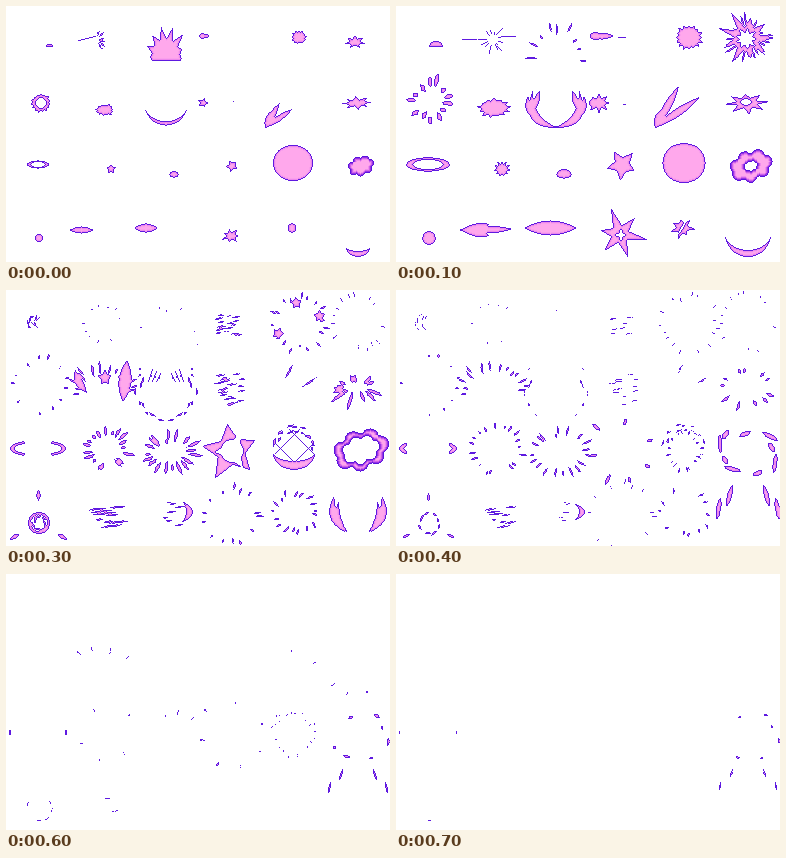
An HTML page with a canvas for the animation above (0.8 s loop, 384 by 256 pixels).

```html
<!DOCTYPE html>
<html lang="en">
<head>
<meta charset="utf-8">
<title>Impact effects</title>
<style>
html, body { margin: 0; width: 100%; height: 100%; overflow: hidden; background: #fff; }
canvas { display: block; width: 384px; height: 256px; image-rendering: pixelated; }
</style>
</head>
<body>
<canvas id="stage" width="384" height="256"></canvas>
<script>
const W = 384, H = 256, STEP = 100, COUNT = 8, PI = Math.PI;
const view = document.getElementById('stage').getContext('2d');
const mask = document.createElement('canvas');
mask.width = W;
mask.height = H;
const g = mask.getContext('2d', { willReadFrequently: true });

// colours from the edge inwards
const BODY = [255, 168, 236];
const PLAIN = [[94, 26, 224], [236, 136, 236], [250, 160, 236]];
const DEEP = [[90, 20, 222], [150, 52, 226], [206, 98, 234], [240, 142, 238]];

function random(seed) {
  let s = (seed * 1103515 + 12345) % 2147483647;
  return () => (s = s * 16807 % 2147483647) / 2147483647;
}

const fill = d => g.fill(new Path2D(d));
function cut(d) {
  g.globalCompositeOperation = 'destination-out';
  fill(d);
  g.globalCompositeOperation = 'source-over';
}

// shapes as path data
const oval = (x, y, rx, ry = rx) =>
  `M${x - rx} ${y}a${rx} ${ry} 0 1 0 ${2 * rx} 0a${rx} ${ry} 0 1 0 ${-2 * rx} 0Z`;
const dome = (x, y, rx, ry) => `M${x - rx} ${y}a${rx} ${ry} 0 0 1 ${2 * rx} 0Z`;
const bowl = (x, y, r, ry, thick) =>
  `M${x - r} ${y}a${r} ${ry} 0 0 0 ${2 * r} 0a${r} ${ry - thick} 0 0 1 ${-2 * r} 0Z`;
const crescent = (x, y, r) =>
  `M${x} ${y - r}a${r} ${r} 0 0 0 0 ${2 * r}a${r * 1.5} ${r * 1.5} 0 0 1 0 ${-2 * r}Z`;

function star(x, y, rx, ry, n, inner, rot = -PI / 2, jag = .25) {
  const r = random(n + rx);
  let d = '';
  for (let i = 0; i < n * 2; i++) {
    const a = rot + PI * i / n, k = i % 2 ? inner : 1.08 - jag * r();
    d += (i ? 'L' : 'M') + (x + Math.cos(a) * rx * k) + ' ' + (y + Math.sin(a) * ry * k);
  }
  return d + 'Z';
}

// pointed at both ends, w wide, bowed sideways by bend
function leaf(x, y, x2, y2, w, bend = 0) {
  const l = Math.hypot(x2 - x, y2 - y), nx = (y - y2) / l, ny = (x2 - x) / l;
  const mid = o => `${(x + x2) / 2 + nx * o} ${(y + y2) / 2 + ny * o}`;
  return `M${x} ${y}Q${mid(2 * bend + w)} ${x2} ${y2}Q${mid(2 * bend - w)} ${x} ${y}Z`;
}

function mirror(x, draw) {
  draw();
  g.save();
  g.translate(2 * x, 0);
  g.scale(-1, 1);
  draw();
  g.restore();
}

// tapered line on whole pixels
function sliver(x, y, x2, y2, w = 1) {
  const n = Math.round(Math.max(Math.abs(x2 - x), Math.abs(y2 - y)));
  for (let i = 0; i <= n; i++) {
    const t = n ? i / n : .5, s = Math.max(1, Math.round(w * Math.sin(PI * (t * .8 + .1))));
    const o = (s - 1) / 2;
    g.fillRect(Math.round(x + (x2 - x) * t - o), Math.round(y + (y2 - y) * t - o), s, s);
  }
}

// slivers that fly outwards, slow down, shrink and die one by one
function debris(k, { at, x, y, n, r, ry = r, grow = 14, len = 8, w = 2.4, fade = .55,
  from = 0, to = 2 * PI, turn = 0, last = 6 }) {
  const age = k - at, u = random(n * 7 + x);
  if (age < 0 || k > last) return;
  const push = grow * (1 - .5 ** age), thick = w * .78 ** age;
  for (let i = 0; i < n; i++) {
    const a = from + (to - from) * (i + .8 * u()) / n, spread = .8 + .35 * u();
    const l = len * (.4 + 1.1 * u()) * fade ** age, life = 1.2 + 3 * u();
    if (age > life) continue;
    const px = x + Math.cos(a) * (r * spread + push), py = y + Math.sin(a) * (ry * spread + push);
    sliver(px, py, px + Math.cos(a + turn) * l, py + Math.sin(a + turn) * l, thick);
  }
}

// sideways slivers drifting right
function streaks(k, { at, x, y, w, h, n, len, drift = 14, thick = 2, slope = -.12, last = 6 }) {
  const age = k - at, u = random(n * 5 + x);
  if (age < 0 || k > last) return;
  for (let i = 0; i < n; i++) {
    const px = x + w * u() + drift * (1 - .6 ** age) * 1.5, py = y + h * (i + u()) / n;
    const l = len * (.3 + u()) * .6 ** age;
    if (age < 1 + 2.6 * u()) sliver(px, py, px + l, py + l * slope, thick * .8 ** age);
  }
}

function cloud(x, y, rx, ry, hole) {
  const lobes = (s, paint) => {
    paint(oval(0, 0, rx * .82 * s, ry * .8 * s));
    for (let i = 0; i < 7; i++) {
      const a = i * 2 * PI / 7;
      paint(oval(Math.cos(a) * rx * .66 * s, Math.sin(a) * ry * .6 * s, ry * .42 * s));
    }
  };
  g.save();
  g.fillStyle = '#f00';
  g.translate(x, y);
  g.rotate(-.3);
  lobes(1, fill);
  if (hole) lobes(hole, cut);
  g.restore();
}

const effects = [
  // row 1
  k => {
    if (k < 2) fill(dome(43.5 - 3.5 * k, 41, 3.5 * (k + 1), 3 * (k + 1)));
    if (k === 2) [28, 38].forEach(x => fill(crescent(x, 33.5, 7.5)));
    [28, 34].forEach(x => debris(k, { at: 3, x, y: 33, n: 4, r: 6, grow: 5, len: 5, w: 1.6, from: 2, to: 4.4, turn: PI / 2, last: 5 }));
  },
  k => {
    if (k === 0) sliver(72, 34, 89, 30);
    if (k === 1 || k === 2) {
      sliver(66, 33, 80 - 10 * (k - 1), 33);
      sliver(105, 30, 119, 30);
    }
    debris(k, { at: 0, x: 90, y: 33, n: 6, r: 4, len: 5, w: 1.6, from: -1.3, to: 1.3, last: 0 });
    debris(k, { at: 1, x: 96, y: 33, n: 12, r: 6, grow: 16, len: 6, w: 1.2, fade: .45, last: 4 });
  },
  k => {
    if (k === 0) {
      fill(star(160, 50, 23, 28, 13, .62, -PI / 2 - .2, .4));
      cut('M130 55h60v30h-60Z');
    }
    debris(k, { at: 1, x: 160, y: 52, n: 9, r: 21, ry: 27, grow: 9, len: 7, from: PI, to: 2 * PI + .2, fade: .35, last: 4 });
  },
  k => {
    if (k < 2) {
      fill(oval(196.5 + 3 * k, 30, 3 + 3 * k, 3 + k));
      fill(leaf(194, 30, 204 + 14 * k, 30, 4 + 3 * k));
    }
    if (k === 1) sliver(222, 31, 229, 31);
    if (k === 2) sliver(214, 32, 238, 27);
    streaks(k, { at: 2, x: 198, y: 24, w: 26, h: 22, n: 17, len: 11, last: 4 });
  },
  k => {
    if (k < 2) fill(star(293, 31.5, 8 + 7 * k, 7.5 + 6 * k, 13 + 3 * k, .74));
    if (k === 2 || k === 3) {
      const size = 13 - 2 * k;
      for (const a of [-1.65, -.35, k === 2 ? .6 : 2.6])
        fill(star(292 + 23 * Math.cos(a), 33 + 20 * Math.sin(a), size, size, 5, .52, a));
    }
    debris(k, { at: 2, x: 292, y: 33, n: 19, r: 18, grow: 12, len: 7, last: 5 });
  },
  k => {
    if (k === 0) fill(star(349, 36, 11, 7, 7, .5));
    if (k === 1) {
      fill(star(351, 32, 30, 28, 9, .4, -1.4, .35));
      cut(star(350, 33, 12, 11, 9, .5, -1.4));
    }
    if (k === 2) fill(leaf(357, 38, 373, 46, 7));
    debris(k, { at: 1, x: 352, y: 32, n: 21, r: 12, grow: 18, len: 10, last: 5 });
  },
  // row 2
  k => {
    if (k === 0) {
      fill(star(35, 97, 10.5, 10, 15, .78));
      cut(oval(35, 97, 5));
    }
    debris(k, { at: 1, x: 35, y: 95, n: 13, r: 14, grow: 15, len: 9, w: 4, fade: .6 });
  },
  k => {
    if (k < 2) fill(star(99 - k, 104 - 2 * k, 10 + 7 * k, 6.5 + 4 * k, 13, .72));
    if (k === 2) {
      fill(star(106, 94, 19, 19, 10, .75, -1.2));
      cut(oval(99, 93, 7, 6));
      cut(leaf(84, 106, 110, 106, 10));
      fill(leaf(71, 78, 83, 103, 10, 3));
    }
    if (k === 3) {
      fill(leaf(69, 80, 81, 103, 8, 2));
      fill(star(99, 88, 8, 9, 5, .5));
      fill(leaf(121, 70, 117, 112, 13));
    }
    debris(k, { at: 3, x: 96, y: 104, n: 15, r: 27, ry: 23, grow: 6, len: 9, fade: .8, from: PI, to: 2 * PI });
  },
  k => {
    if (k === 0) fill(bowl(160, 97, 22, 22.5, 4));
    if (k === 1) mirror(160, () => {
      fill(leaf(137, 84, 163, 122, 9, 13));
      fill(leaf(132, 90, 137, 112, 6, 2));
      fill(leaf(144, 84, 137, 106, 6));
    });
    if (k === 2 || k === 3) mirror(160, () => {
      for (let i = 0; i < 3; i++)
        sliver(146 + 4 * i, 79 + 2 * i, 139 + 4 * i + k, 94 - 3 * (k - 2), 4.5 - k);
    });
    mirror(160, () => debris(k, { at: 2, x: 160, y: 97, n: 10, r: 27, grow: 5, len: 9, w: 2.6, from: PI / 2, to: 3.9, turn: PI / 2 + .2 }));
  },
  k => {
    if (k === 0) fill(star(197, 97, 6, 5, 5, .5, 0));
    if (k === 1) {
      fill(star(203, 97, 12, 10, 8, .55, 0));
      fill(oval(199, 97, 6, 5));
    }
    if (k < 2) sliver(227, 95 + 3 * k, 227 + 2 * k, 95 + 3 * k);
    if (k === 2) sliver(202, 97, 222, 91, 2);
    streaks(k, { at: 2, x: 198, y: 83, w: 27, h: 32, n: 20, len: 12, last: 5 });
  },
  k => {
    const tips = [[44, -30], [23, -41], [6, -18]];
    if (k < 2) for (const [x, y] of tips) {
      const s = k ? 1 : .6 + .3 * (x < 10);
      fill(leaf(259, 122, 260 + x * s, 121 + y * s, 6 + 2 * k));
    }
    const age = k - 2;
    if (age >= 0 && k < 7) for (const [x, y] of tips.slice(0, 2)) {
      const a = .55 + .55 * (1 - .5 ** age), b = a + .6 * .5 ** age;
      sliver(260 + x * a, 121 + y * a, 260 + x * b, 121 + y * b, 2.4 * .8 ** age);
    }
    if (k === 2) sliver(283, 98, 291, 91, 2);
  },
  k => {
    if (k < 3) fill(star(351, 97, 16 + 6 * k, 7 + 4 * k, 8, .5, -.1));
    if (k === 1) cut(oval(350, 96, 5, 3));
    if (k === 2) cut(star(351, 97, 10, 5, 6, .5, 0));
    if (k === 3) fill(star(333, 100, 8, 6, 5, .5, 0));
    debris(k, { at: 3, x: 350, y: 97, n: 11, r: 12, ry: 5, grow: 19, len: 14, w: 3.4 });
  },
  // row 3
  k => {
    const rx = 29.5 - 18.5 * .42 ** k, ry = 8.5 - 4.5 * .3 ** k, gap = 30 * (1 - .55 ** (k - 2));
    fill(oval(32, 158.5, rx, ry));
    cut(oval(32, 158.5, rx - (k < 2 ? 4 + 3 * k : 5), ry - (k < 2 ? 1.5 + k : 2.8)));
    if (gap > 0) cut(`M${32 - gap} 145h${2 * gap}v28h${-2 * gap}Z`);
  },
  k => {
    if (k < 2) fill(star(105 + k, 163, 5 + 4 * k, 5 + 4 * k, 5 + 6 * k, .55));
    if (k === 2) fill(star(103, 164, 17, 16, 15, .66, -1.2, .35));
    debris(k, { at: 3, x: 100, y: 160, n: 18, r: 15, grow: 14, len: 8, w: 3, from: 1.6, to: 7.4, fade: .6 });
  },
  k => {
    if (k < 2) {
      fill(dome(168, 169, 4.5 + 3 * k, 4 + 2 * k));
      fill(oval(168, 169, 4.5 + 3 * k, 2.5 + k));
    }
    if (k === 2) fill(star(168, 165, 20, 15, 17, .72));
    debris(k, { at: 3, x: 163, y: 162, n: 19, r: 18, ry: 11, grow: 13, len: 10, w: 3, fade: .68 });
  },
  k => {
    if (k === 0) fill(star(226, 160, 7, 7, 5, .5, -2));
    if (k === 1) fill(star(226, 159, 16, 16, 5, .5, -2.1));
    if (k === 2) {
      fill(star(224, 160, 26, 26, 7, .58, -.2));
      cut(oval(225, 160, 6));
    }
    if (k === 3) {
      fill(star(225, 161, 32, 30, 5, .46, -1.7));
      cut(oval(226, 161, 11));
      cut(star(226, 161, 19, 19, 3, .4, -1.1));
    }
    debris(k, { at: 4, x: 225, y: 160, n: 7, r: 27, grow: 6, len: 8, w: 3.4, from: -1.8, to: 4.4 });
  },
  k => {
    const bars = w => [-7, 7].forEach(o => {
      sliver(276 + o, 146 - o, 300 + o, 170 - o, w);
      sliver(276 + o, 170 + o, 300 + o, 146 + o, w);
    });
    if (k < 2) fill(oval(287 + k, 157, 20 + 1.5 * k, 18 + 2 * k));
    if (k === 2 || k === 3) {
      bars(7 - 2 * k);
      cut(oval(288, 158, 5));
    }
    if (k === 2) {
      fill(oval(288, 158, 21.5, 21) + star(288, 158, 17, 17, 40, 1, 0, .08).replace('Z', '')) ;
      cut(oval(288, 158, 17));
      bars(3);
    }
    if (k === 3) fill(bowl(288, 161, 21.5, 19, 9));
    debris(k, { at: 3, x: 288, y: 158, n: 16, r: 20, grow: 3, len: 5, w: 2, from: PI, to: 2 * PI, turn: PI / 2 });
    debris(k, { at: 4, x: 288, y: 161, n: 18, r: 16, grow: 5, len: 3, w: 1.5 });
  },
  k => {
    if (k < 4) cloud(355, 160, 33 - 19 * .5 ** k, 22 - 12 * .5 ** k, k && 1 - .7 ** k);
    debris(k, { at: 4, x: 352, y: 161, n: 9, r: 28, ry: 20, grow: 3, len: 13, w: 4.4, turn: PI / 2, fade: .6, last: 7 });
  },
  // row 4
  k => {
    const spokes = (from, to, w) => [0, 1, 2].forEach(i => {
      const a = -PI / 2 + i * 2 * PI / 3, c = Math.cos(a), s = Math.sin(a);
      fill(leaf(32.5 + c * from, 233 + s * from, 32.5 + c * to, 233 + s * to, w));
    });
    if (k < 2) fill(oval(33, 232, 4 + 2.8 * k));
    if (k === 2) {
      fill(star(32.5, 234, 27, 30, 3, .4, -PI / 2, 0));
      cut(oval(33, 232, 5.5));
    }
    if (k === 3) {
      fill(oval(33, 233, 11));
      cut(oval(33, 233, 8));
    }
    if (k > 2 && k < 6) spokes(24 - 2 * k / 3, 42 - 3 * k, 9 - 1.5 * k);
    debris(k, { at: 3, x: 33, y: 233, n: 9, r: 6, grow: 8, len: 5, turn: PI / 2, fade: .8, last: 7 });
  },
  k => {
    if (k === 0) fill(leaf(63, 224, 88, 224, 7));
    if (k === 1 || k === 2) {
      fill(leaf(62, 224, 109 + 8 * k, 223, 7 + k));
      [-1, 1].forEach(s => fill(leaf(62 + 3 * k, 224, 80 + 14 * k, 224 + s * (2 + 4 * k), 5 + 2 * k)));
    }
    streaks(k, { at: 3, x: 82, y: 215, w: 24, h: 22, n: 9, len: 18, drift: 10 });
  },
  k => {
    if (k < 2) fill(leaf(128, 222, 152 + 29 * k, 222, 9 + 6 * k));
    if (k > 1 && k < 6) {
      const s = 13 - 2 * (k - 2);
      fill(leaf(174 + 2 * (k - 2), 222 - s, 172 + 3 * (k - 2), 222 + s, 8 - (k - 2), -8));
    }
    streaks(k, { at: 2, x: 146, y: 209, w: 14, h: 28, n: 7, len: 14, drift: 18 });
  },
  k => {
    if (k === 0) fill(star(225, 230, 10, 8, 7, .48, 0));
    if (k === 1) {
      fill(star(224, 228, 27, 26, 6, .34, .2, .35));
      cut(star(225, 229, 6, 6, 4, .4, 0));
    }
    debris(k, { at: 2, x: 224, y: 225, n: 14, r: 13, grow: 24, len: 9 });
  },
  k => {
    if (k === 0) fill(oval(286, 222, 4.5));
    if (k === 1) {
      fill(star(286, 222, 14, 13, 7, .42, -.8, .4));
      cut(leaf(281, 230, 291, 214, 2));
    }
    if (k === 2) {
      fill(leaf(272, 209, 277, 238, 10, -3));
      fill(leaf(294, 203, 292, 228, 9, -2));
      fill(leaf(308, 222, 290, 236, 8, 2));
    }
    debris(k, { at: 2, x: 288, y: 222, n: 17, r: 13, ry: 10, grow: 14, len: 7, w: 2.8, turn: .5, fade: .75 });
  },
  k => {
    if (k < 2) fill(bowl(352, 241 - 15 * k, 12 + 11.5 * k, 10 + 15 * k, 6 + k));
    if (k === 2) mirror(352, () => {
      fill(leaf(325, 202, 355, 252, 10, 12));
      fill(leaf(322, 214, 334, 244, 8, 3));
      fill(leaf(334, 211, 335, 240, 7));
    });
    if (k === 3) mirror(352, () => {
      fill(leaf(328, 206, 339, 242, 8, 6));
      fill(leaf(333, 211, 342, 243, 5, 5));
    });
    if (k > 3) mirror(352, () => {
      const l = 20 * .72 ** (k - 4), w = 4.5 * .7 ** (k - 4);
      sliver(336, 195, 336 - l * .3, 195 + l, w);
      sliver(324, 208, 324 - l * .2, 208 + l, w);
    });
  }
];

// colour the mask by distance from its edge
function shade() {
  const image = g.getImageData(0, 0, W, H), px = image.data;
  const solid = Uint8Array.from({ length: W * H }, (_, i) => px[i * 4 + 3] > 110);
  const open = (x, y) => x >= 0 && y >= 0 && x < W && y < H && !solid[y * W + x];
  const near = (x, y, r) => open(x - r, y) || open(x + r, y) || open(x, y - r) || open(x, y + r);
  for (let y = 0; y < H; y++) for (let x = 0; x < W; x++) {
    const i = y * W + x, ramp = px[i * 4] > 100 ? DEEP : PLAIN;
    const c = solid[i] ? ramp.find((_, d) => near(x, y, d + 1)) || BODY : [255, 255, 255];
    px.set([...c, 255], i * 4);
  }
  return image;
}

const steps = Array.from({ length: COUNT }, (_, k) => {
  g.clearRect(0, 0, W, H);
  effects.forEach(effect => effect(k));
  return shade();
});

function play(now) {
  view.putImageData(steps[Math.floor(now / STEP) % COUNT], 0, 0);
  requestAnimationFrame(play);
}
play(0);
</script>
</body>
</html>
```
